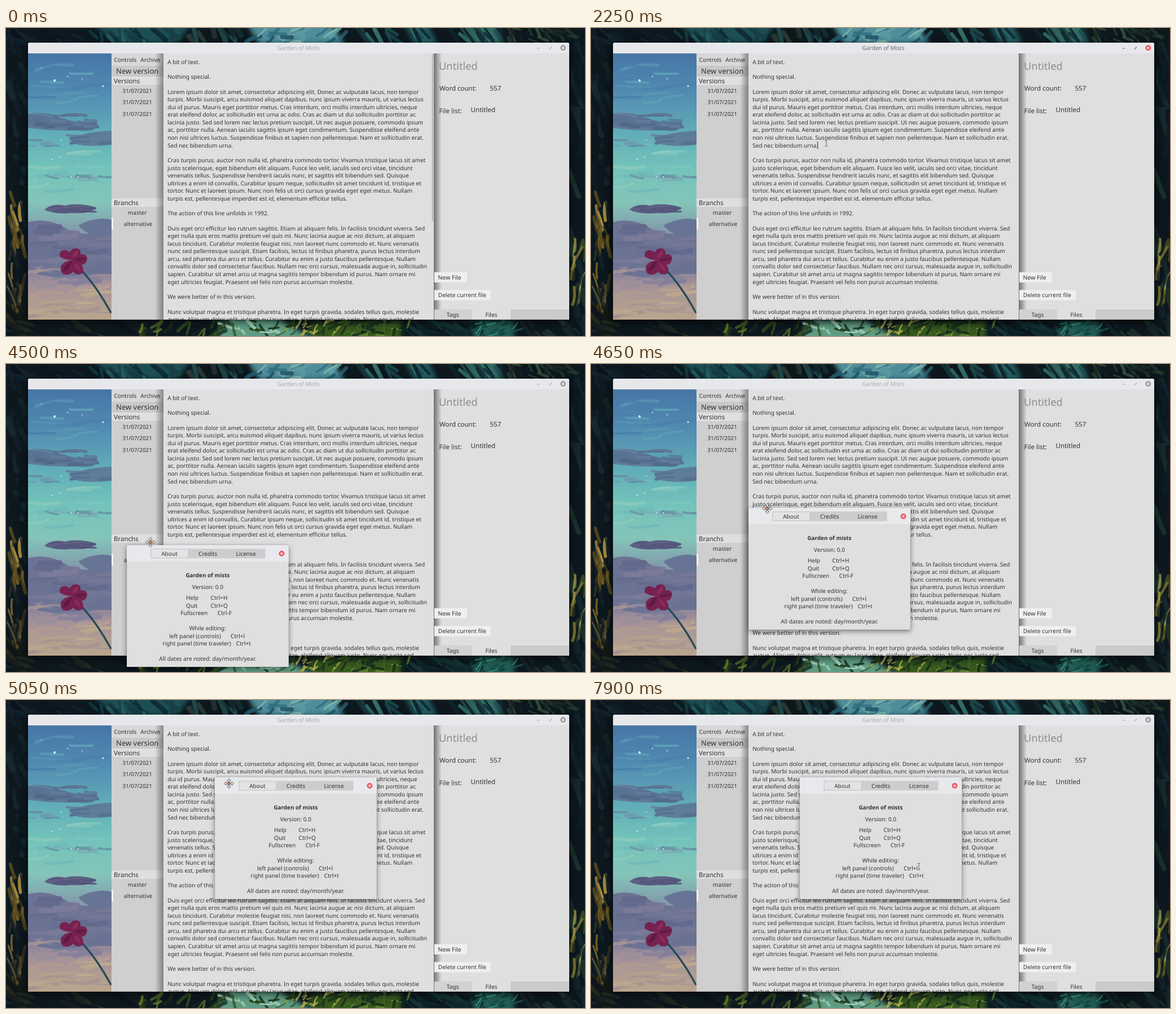
An HTML page for the animation above (8000 ms loop, 1026 by 546 pixels).

```html
<!DOCTYPE html>
<html lang="en">
<head>
<meta charset="utf-8">
<title>Garden of Mists</title>
<style>
html, body { margin: 0; width: 100%; height: 100%; overflow: hidden; background: #0c151c; }
svg { display: block; width: 100%; height: 100%; }
text { font-family: "Noto Sans", "Open Sans", sans-serif; text-rendering: geometricPrecision; fill: #303132; }
</style>
</head>
<body>
<svg id="stage" viewBox="0 0 1026 546">
  <defs>
    <linearGradient id="dusk" x1="0" y1="0" x2="0" y2="1">
      <stop offset="0" stop-color="#4775a6"/>
      <stop offset=".13" stop-color="#5088b0"/>
      <stop offset=".3" stop-color="#62adb8"/>
      <stop offset=".43" stop-color="#73c3bb"/>
      <stop offset=".56" stop-color="#84c4b9"/>
      <stop offset=".64" stop-color="#82a5ae"/>
      <stop offset=".78" stop-color="#77799a"/>
      <stop offset=".86" stop-color="#a08f99"/>
      <stop offset="1" stop-color="#bba78d"/>
    </linearGradient>
    <linearGradient id="shadeL"><stop offset="0" stop-opacity="0"/><stop offset="1" stop-opacity=".38"/></linearGradient>
    <linearGradient id="shadeR"><stop offset="0" stop-opacity=".5"/><stop offset="1" stop-opacity="0"/></linearGradient>
    <filter id="soft" x="-20%" y="-20%" width="140%" height="140%"><feGaussianBlur stdDeviation="7"/></filter>
    <filter id="haze"><feGaussianBlur stdDeviation="5"/></filter>
    <clipPath id="skyClip"><rect x="39" y="45" width="148" height="472"/></clipPath>
    <clipPath id="pageClip"><rect x="279" y="45" width="479" height="472"/></clipPath>
  </defs>
  <g id="wall"></g>
  <rect id="winShade" x="37" y="30" width="963" height="492" filter="url(#soft)"/>
  <g id="win"></g>
  <g id="dialog"></g>
  <g id="cursor"></g>
</svg>
<script>
const $ = id => document.getElementById(id);

function add(parent, tag, attrs, content) {
  const el = document.createElementNS("http://www.w3.org/2000/svg", tag);
  for (const k in attrs) el.setAttribute(k, attrs[k]);
  if (content !== undefined) el.textContent = content;
  parent.appendChild(el);
  return el;
}
const rect = (p, x, y, w, h, fill, more) => add(p, "rect", { x, y, width: w, height: h, fill, ...more });
const path = (p, d, fill, more) => add(p, "path", { d, fill, ...more });
const dot = (p, cx, cy, r, fill, more) => add(p, "circle", { cx, cy, r, fill, ...more });
// y is the middle of the line
const label = (p, s, x, y, size = 10.1, more) =>
  add(p, "text", { x, y: y + size * .36, "font-size": size, ...more }, s);
const mid = { "text-anchor": "middle" };

let seed = 11;
function rnd(a = 0, b = 1) {
  seed = (seed * 16807) % 2147483647;
  return a + (b - a) * seed / 2147483647;
}
// n brush strokes scattered over the box [x0, y0, x1, y1]
function daub(p, n, [x0, y0, x1, y1], colors, len, width, angle = 0, spread = .3) {
  const cols = colors.split(" ");
  for (let i = 0; i < n; i++) {
    const x = rnd(x0, x1), y = rnd(y0, y1), a = angle + rnd(-spread, spread), l = len * rnd(.4, 1) / 2;
    const dx = Math.cos(a) * l, dy = Math.sin(a) * l, bend = rnd(-l, l) * .3;
    path(p, `M${x - dx} ${y - dy}Q${x + bend} ${y + bend} ${x + dx} ${y + dy}`, "none", {
      stroke: cols[i % cols.length], "stroke-width": width * rnd(.4, 1), "stroke-linecap": "round",
      opacity: rnd(.6, 1).toFixed(2) });
  }
}

function drawWall(g) {
  rect(g, 0, 0, 1026, 546, "#0c171e");
  const glow = add(g, "g", { filter: "url(#haze)" });
  path(glow, "M150-10L200 30H300L330-10Z", "#1b5055");
  path(glow, "M425-10L450 30H600L575-10Z", "#4d8e9a");
  path(glow, "M705-10L725 30H765L745-10Z", "#235c62");
  path(glow, "M815-10L835 30H880L870-10Z", "#2d6b63");
  path(glow, "M370 560L385 515H480L560 560Z", "#5f9a83");
  path(glow, "M540 560V525L700 520V560Z", "#35561f");
  path(glow, "M820 560L840 520H900V560Z", "#215c54");
  daub(g, 22, [155, 0, 300, 26], "#123a40 #2a666a #183f46 #0f2a32", 40, 9, 1, .6);
  daub(g, 22, [435, 0, 600, 26], "#5f9ca3 #316f80 #80b5ad #24586a", 36, 8, -.4, .5);
  daub(g, 18, [330, 0, 430, 26], "#17353b #2b3a32 #0e2229 #28575a", 32, 9, 1.1);
  daub(g, 26, [600, 0, 880, 26], "#0e252c #1d474d #13323a #357168", 42, 8, .9);
  daub(g, 24, [880, 0, 1026, 30], "#101a1e #24402e #1a2b28 #35533a", 34, 7, .6, .8);
  daub(g, 20, [0, 0, 150, 26], "#0b141c #14242d #0f1c25", 40, 9, .5);
  daub(g, 24, [0, 20, 38, 290], "#0c151e #13232c #182b30 #0f1d28", 50, 11, 1.4);
  daub(g, 34, [2, 290, 36, 490], "#7a6325 #a48a3c #31331f #5c4a1c #152228 #15272b", 52, 6, 1.45);
  daub(g, 12, [0, 490, 38, 546], "#15180f #2f2c17 #0d161b", 40, 10, 1);
  daub(g, 32, [1000, 30, 1026, 546], "#0c1820 #14292f #0e1d26 #1e3630", 55, 11, 1.5);
  daub(g, 16, [1003, 370, 1026, 480], "#7c752e #3d4a25 #a59a47 #1d2d25", 36, 5, 1.8);
  daub(g, 26, [0, 520, 240, 546], "#0d141a #161e21 #10191f #202a21", 50, 10, .3);
  daub(g, 26, [235, 520, 385, 546], "#38521d #192b1b #5d7628 #14241f", 24, 6, -.8, .6);
  daub(g, 26, [375, 518, 480, 546], "#9dcdb4 #1f3a2c #5c9a80 #25471f", 24, 6, .7, .8);
  daub(g, 34, [470, 520, 590, 546], "#8c9a3a #2a481d #b7b357 #1c3419", 20, 4, -.7, .9);
  daub(g, 34, [580, 520, 715, 546], "#3e6426 #17301c #6b8a33 #102420", 26, 5, -.6, .9);
  daub(g, 26, [710, 520, 840, 546], "#0d2023 #163538 #0f2a2d", 40, 9, .5);
  daub(g, 20, [830, 520, 910, 546], "#338a76 #123c3b #1d5d55", 26, 4, -.5, .7);
  daub(g, 18, [905, 520, 1026, 546], "#0b171c #14262a #20372e", 38, 9, .8);
}

function drawSky(parent) {
  const g = add(parent, "g", { "clip-path": "url(#skyClip)" });
  rect(g, 39, 45, 148, 472, "url(#dusk)");
  daub(g, 14, [39, 65, 187, 140], "#5a97b6 #4b80ab #62a2ba", 70, 6, -.05, .12);
  daub(g, 14, [39, 215, 187, 300], "#7dcabf #70bcb9 #8ccbbd", 70, 7, -.05, .1);
  path(g, "M39 152Q70 147 95 158T160 168L166 177Q120 186 39 177Z", "#597394");
  daub(g, 14, [39, 155, 150, 180], "#526988 #63809c #5a6e90", 45, 6, .04, .1);
  path(g, "M112 196Q140 184 187 182V207Q150 212 118 205Z", "#5d7b97");
  daub(g, 9, [125, 188, 187, 206], "#667f9d #566f90", 42, 5, -.08, .1);
  daub(g, 7, [39, 195, 95, 210], "#6b98ab #608ca4", 35, 4, 0, .1);
  daub(g, 10, [80, 258, 187, 272], "#6894a6 #7aa9ae", 36, 4, .1, .12);
  path(g, "M68 322Q82 310 104 315Q126 309 160 318Q152 330 118 328Q86 331 68 322Z", "#57597f");
  daub(g, 8, [80, 317, 148, 325], "#646486 #505478", 34, 4, 0, .1);
  path(g, "M39 344Q72 336 100 352Q130 372 187 362V438Q130 452 39 434Z", "#6c7393");
  path(g, "M128 350Q160 333 187 340V372Q150 374 128 350Z", "#687495");
  daub(g, 26, [39, 348, 187, 432], "#62698c #757897 #7f7d9b #686f92", 60, 10, -.05, .14);
  daub(g, 18, [39, 428, 187, 466], "#978b9b #83809b #a89799", 58, 7, -.05, .1);
  daub(g, 20, [39, 460, 187, 517], "#b29c90 #c0aa8e #a6948f #b7a48c", 65, 7, -.06, .1);
  const star = (x, y, r) => dot(g, x, y, r, "#f2faf9");
  star(86, 93, 2.1); star(109, 86, 1.1); star(135, 90, 1); star(172, 103, 1.5); star(62, 71, .7);
  star(98, 198, .9); star(82, 233, 1); star(95, 229, 1.1); star(116, 264, 1); star(128, 264, 1.1);
  path(g, "M128 424Q158 453 186 505", "none", { stroke: "#294b55", "stroke-width": 3.4 });
  path(g, "M118 411Q104 412 95 405Q94 396 101 394Q108 393 113 398Q117 389 126 391Q133 392 132 401Q143 400 144 409Q142 419 134 420Q140 428 135 435Q126 440 119 432Q111 440 101 436Q95 430 98 421Q104 413 118 411Z", "#77224f");
  path(g, "M118 413Q107 417 100 431Q110 432 118 413ZM121 412Q130 405 142 408Q132 416 121 412Z", "#5b1a45");
  path(g, "M117 408Q119 398 127 394Q128 404 117 408ZM120 416Q124 427 132 432Q131 421 120 416Z", "#8e2d5b");
}

const paragraphs = [
  [60, `A bit of text.`],
  [86.5, `Nothing special.`],
  [113, `Lorem ipsum dolor sit amet, consectetur adipiscing elit. Donec ac vulputate lacus, non tempor
turpis. Morbi suscipit, arcu euismod aliquet dapibus, nunc ipsum viverra mauris, ut varius lectus
dui id purus. Mauris eget porttitor metus. Cras interdum, orci mollis interdum ultricies, neque
erat eleifend dolor, ac sollicitudin est urna ac odio. Cras ac diam ut dui sollicitudin porttitor ac
lacinia justo. Sed sed lorem nec lectus pretium suscipit. Ut nec augue posuere, commodo ipsum
ac, porttitor nulla. Aenean iaculis sagittis ipsum eget condimentum. Suspendisse eleifend ante
non nisi ultrices luctus. Suspendisse finibus et sapien non pellentesque. Nam et sollicitudin erat.
Sed nec bibendum urna.`],
  [234.5, `Cras turpis purus, auctor non nulla id, pharetra commodo tortor. Vivamus tristique lacus sit amet
justo scelerisque, eget bibendum elit aliquam. Fusce leo velit, iaculis sed orci vitae, tincidunt
venenatis tellus. Suspendisse hendrerit iaculis nunc, et sagittis elit bibendum sed. Quisque
ultrices a enim id convallis. Curabitur ipsum neque, sollicitudin sit amet tincidunt id, tristique et
tortor. Nunc et laoreet ipsum. Nunc non felis ut orci cursus gravida eget eget metus. Nullam
turpis est, pellentesque imperdiet est id, elementum efficitur tellus.`],
  [328.5, `The action of this line unfolds in 1992.`],
  [355, `Duis eget orci efficitur leo rutrum sagittis. Etiam at aliquam felis. In facilisis tincidunt viverra. Sed
eget nulla quis eros mattis pretium vel quis mi. Nunc lacinia augue ac nisi dictum, at aliquam
lacus tincidunt. Curabitur molestie feugiat nisi, non laoreet nunc commodo et. Nunc venenatis
nunc sed pellentesque suscipit. Etiam facilisis, lectus id finibus pharetra, purus lectus interdum
arcu, sed pharetra dui arcu et tellus. Curabitur eu enim a justo faucibus pellentesque. Nullam
convallis dolor sed consectetur faucibus. Nullam nec orci cursus, malesuada augue in, sollicitudin
sapien. Curabitur sit amet arcu ut magna sagittis tempor bibendum id purus. Nam ornare mi
eget ultricies feugiat. Praesent vel felis non purus accumsan molestie.`],
  [476.5, `We were better of in this version.`],
  [503, `Nunc volutpat magna et tristique pharetra. In eget turpis gravida, sodales tellus quis, molestie
augue. Aliquam dolor velit, rutrum eu lacus vitae, eleifend aliquam justo. Nunc nec justo sed`]
];

function closeButton(p, x, y) {
  const c = dot(p, x, y, 5, "#9b9fa5");
  path(p, `M${x - 1.8} ${y - 1.8}l3.6 3.6m0-3.6l-3.6 3.6`, "none", { stroke: "#fff", "stroke-width": 1.1 });
  return c;
}

function drawWindow(g) {
  path(g, "M39 517V29Q39 26 42 26H995Q998 26 998 29V517Z", "#dfdfdf");
  path(g, "M39 45V29Q39 26 42 26H995Q998 26 998 29V45Z", "#e7e8eb");
  const title = label(g, "Garden of Mists", 518, 35.5, 10.1, mid);
  const marks = path(g, "M941.5 36h4.5M963.5 37.5v-1m0 1h1m2-4v1m0-1h-1M964 37l2.2-3", "none", { "stroke-width": 1.1 });
  const close = closeButton(g, 987.3, 35.2);
  drawSky(g);

  rect(g, 187, 45, 92, 472, "#cfcfcf");
  rect(g, 187, 45, 92, 22, "#d8d8d8");
  rect(g, 187, 67, 92, 19, "#c9c9c9");
  rect(g, 187, 86, 92, 15, "#dfdfdf");
  rect(g, 187, 302, 92, 15, "#dfdfdf");
  rect(g, 187, 337, 3, 20, "#f3f3f3");
  label(g, "Controls", 191.4, 56.5);
  label(g, "Archive", 238.3, 56.5);
  label(g, "New version", 232.7, 76.5, 13, mid);
  label(g, "Versions", 191, 94, 11.6);
  for (let i = 0; i < 3; i++) label(g, "31/07/2021", 232.6, 111.3 + i * 20.4, 9.9, mid);
  label(g, "Branchs", 191, 309.6, 11.5);
  label(g, "master", 232.6, 327.4, 10.1, mid);
  label(g, "alternative", 234.2, 347.8, 10.1, mid);
  rect(g, 264, 45, 15, 472, "url(#shadeL)");

  const page = add(g, "g", { "clip-path": "url(#pageClip)" });
  rect(page, 278.5, 45, 479.5, 472, "#dfdfdf");
  for (const [y, body] of paragraphs)
    body.split("\n").forEach((line, i) => label(page, line, 286.2, y + i * 13.57));
  const bar = rect(page, 754.8, 46, 2, 296, "#b3b3b3", { rx: 1 });
  const caret = rect(page, 401.2, 201.5, 1, 13, "#222");

  rect(g, 758, 45, 14, 472, "url(#shadeR)");
  label(g, "Untitled", 767, 67.5, 18.3, { style: "fill:#8b8c8d" });
  label(g, "Word count:", 768, 107, 11.5);
  label(g, "557", 857.4, 107, 11.6);
  label(g, "File list:", 767.4, 147, 11.6);
  label(g, "Untitled", 823.5, 145, 11.6);
  rect(g, 759, 433, 58, 18, "#efefef");
  label(g, "New File", 765.6, 442.3, 10.4);
  rect(g, 759, 464.5, 100, 18, "#efefef");
  label(g, "Delete current file", 765.8, 473.6);
  rect(g, 759, 499, 67, 18, "#d2d2d2");
  rect(g, 894, 499, 104, 18, "#cbcbcb");
  label(g, "Tags", 791.6, 508.3, 10.2, mid);
  label(g, "Files", 860, 508.3, 10.2, mid);
  return { title, marks, close, bar, caret };
}

function drawDialog(g) {
  rect(g, 0, 3, 287, 216, "#000", { filter: "url(#haze)", opacity: .45 });
  path(g, "M0 216V3Q0 0 3 0H284Q287 0 287 3V216Z", "#dfdfdf", { stroke: "#000", "stroke-opacity": .18, "stroke-width": .6 });
  path(g, "M0 29V3Q0 0 3 0H284Q287 0 287 3V29Z", "#e8e9ed");
  const tabs = rect(g, 109.5, 6.5, 136, 17, "#cdcdce");
  const active = rect(g, 43, 7, 66, 16, "#e3e3e4", { "stroke-width": .8 });
  label(g, "About", 75.5, 15, 10.1, mid);
  label(g, "Credits", 143.7, 15, 10.1, mid);
  label(g, "License", 211, 15, 10.1, mid);
  const close = closeButton(g, 274.5, 15);
  label(g, "Garden of mists", 143.4, 53, 9.9, { ...mid, "font-weight": 700 });
  label(g, "Version: 0.0", 143.4, 74.8, 10.1, mid);
  const shortcuts = [
    ["Help", 105, "Ctrl+H", 148.5, 93.5], ["Quit", 105, "Ctrl+Q", 148.5, 107.1],
    ["Fullscreen", 95.3, "Ctrl-F", 160.8, 120.6],
    ["left panel (controls)", 75.2, "Ctrl+l", 184, 161.1],
    ["right panel (time traveler)", 63.6, "Ctrl+t", 193.8, 174.6]
  ];
  for (const [name, x, key, kx, y] of shortcuts) { label(g, name, x, y); label(g, key, kx, y); }
  label(g, "While editing:", 143.2, 147.5, 10.1, mid);
  label(g, "All dates are noted: day/month/year.", 143.4, 201.3, 10.1, mid);
  return { tabs, active, close };
}

function drawCursors(g) {
  const arrow = add(g, "g"), beam = add(g, "g"), move = add(g, "g");
  path(arrow, "M0 0V11.6L2.7 9.4L4.6 13.4L6.6 12.4L4.8 8.6L8.2 8.2Z", "#eeeeef",
    { stroke: "#55595f", "stroke-width": .9, "stroke-linejoin": "round" });
  const shape = "M-2.6-5.8Q0-5.8 0-4.4Q0-5.8 2.6-5.8M0-4.4V4.6M-2.6 6Q0 6 0 4.6Q0 6 2.6 6";
  path(beam, shape, "none", { stroke: "#f4f4f4", "stroke-width": 2.4 });
  path(beam, shape, "none", { stroke: "#55585c", "stroke-width": 1.1 });
  for (let a = 0; a < 360; a += 90)
    path(move, "M0-9L3.2-5.2H1.2V-2.6H-1.2V-5.2H-3.2Z", "#f0f0f0",
      { stroke: "#55585c", "stroke-width": .9, "stroke-linejoin": "round", transform: `rotate(${a})` });
  dot(move, 0, 0, 2.5, "#d9764d", { stroke: "#6b5a55", "stroke-width": .7 });
  return { arrow, beam, move };
}

// Keys: [ms, x, y]
const pointerKeys = [
  [150, 76, -16], [500, 228, 58], [1000, 391, 164], [1300, 417, 204], [3300, 417, 204],
  [3500, 315, 301], [3800, 160, 425], [4150, 68, 492], [4200, 68, 492], [4500, 256, 316],
  [4850, 368, 190], [5000, 395, 148], [6450, 395, 148], [6900, 500.5, 268], [7050, 500.5, 268],
  [7300, 565, 298], [7500, 565, 298], [7550, 565, 297.5], [7700, 565, 297.5], [7900, 581, 295]
];
const dialogKeys = [[4150, 39, 486], [4250, 56, 471], [4500, 214, 321], [4850, 341, 184], [5050, 370, 137]];

// Smooth curve through the keys that never overshoots
function at(keys, t, c) {
  const last = keys.length - 1;
  if (t <= keys[0][0]) return keys[0][c];
  if (t >= keys[last][0]) return keys[last][c];
  const i = keys.findIndex(k => k[0] > t) - 1;
  const slope = j => {
    if (j <= 0 || j >= last) return 0;
    const [a, b, d] = [keys[j - 1], keys[j], keys[j + 1]];
    const l = (b[c] - a[c]) / (b[0] - a[0]), r = (d[c] - b[c]) / (d[0] - b[0]);
    return l * r <= 0 ? 0 : 2 * l * r / (l + r);
  };
  const p = keys[i], q = keys[i + 1], h = q[0] - p[0], u = (t - p[0]) / h, v = 1 - u;
  return p[c] * v * v * (1 + 2 * u) + slope(i) * h * u * v * v
    + q[c] * u * u * (3 - 2 * u) - slope(i + 1) * h * u * u * v;
}

drawWall($("wall"));
const win = drawWindow($("win")), dlg = drawDialog($("dialog")), ptr = drawCursors($("cursor"));
const set = (el, k, v) => el.setAttribute(k, v);
const show = (el, on) => el.style.display = on ? "" : "none";

function pointerKind(t, x, y) {
  if (t >= 4200 && t < 5250) return "move";
  if (t >= 5250) return y > 222 ? "beam" : "arrow";
  return x > 279 && x < 757 && y > 45 ? "beam" : "arrow";
}

function render(ms) {
  const t = Math.floor(ms / 50) * 50;
  const focused = t >= 2250 && t < 4200, dlgFocused = t >= 4200;
  win.title.style.fill = focused ? "#62676e" : "#a5a9ae";
  set(win.marks, "stroke", focused ? "#6a6f76" : "#a5a9ae");
  set(win.close, "fill", focused ? "#ed5b62" : "#9b9fa5");
  show(win.caret, focused);
  show(win.bar, t < 2250);
  set($("winShade"), "opacity", focused ? .7 : .45);

  const grow = Math.min(1, Math.max(0, (t - 2750) / 300));
  const scale = .9 + .1 * grow * (2 - grow);
  show($("dialog"), grow > 0);
  set($("dialog"), "opacity", grow);
  set($("dialog"), "transform", `translate(${Math.round(at(dialogKeys, t, 1))} ${Math.round(at(dialogKeys, t, 2))})` +
    ` translate(143.5 108) scale(${scale}) translate(-143.5 -108)`);
  set(dlg.close, "fill", dlgFocused ? "#ed5b62" : "#b3b5b9");
  set(dlg.tabs, "fill", dlgFocused ? "#cdcdce" : "#d9d9da");
  set(dlg.active, "stroke", dlgFocused ? "#b4b5b7" : "none");
  set(dlg.active, "fill", dlgFocused ? "#e3e3e4" : "#dededf");

  const x = at(pointerKeys, t, 1), y = at(pointerKeys, t, 2), kind = pointerKind(t, x, y);
  set($("cursor"), "transform", `translate(${x} ${y})`);
  for (const k in ptr) show(ptr[k], k === kind && t >= 200);
}

function tick() {
  render(performance.now() % 8000);
  requestAnimationFrame(tick);
}
tick();
</script>
</body>
</html>
```
